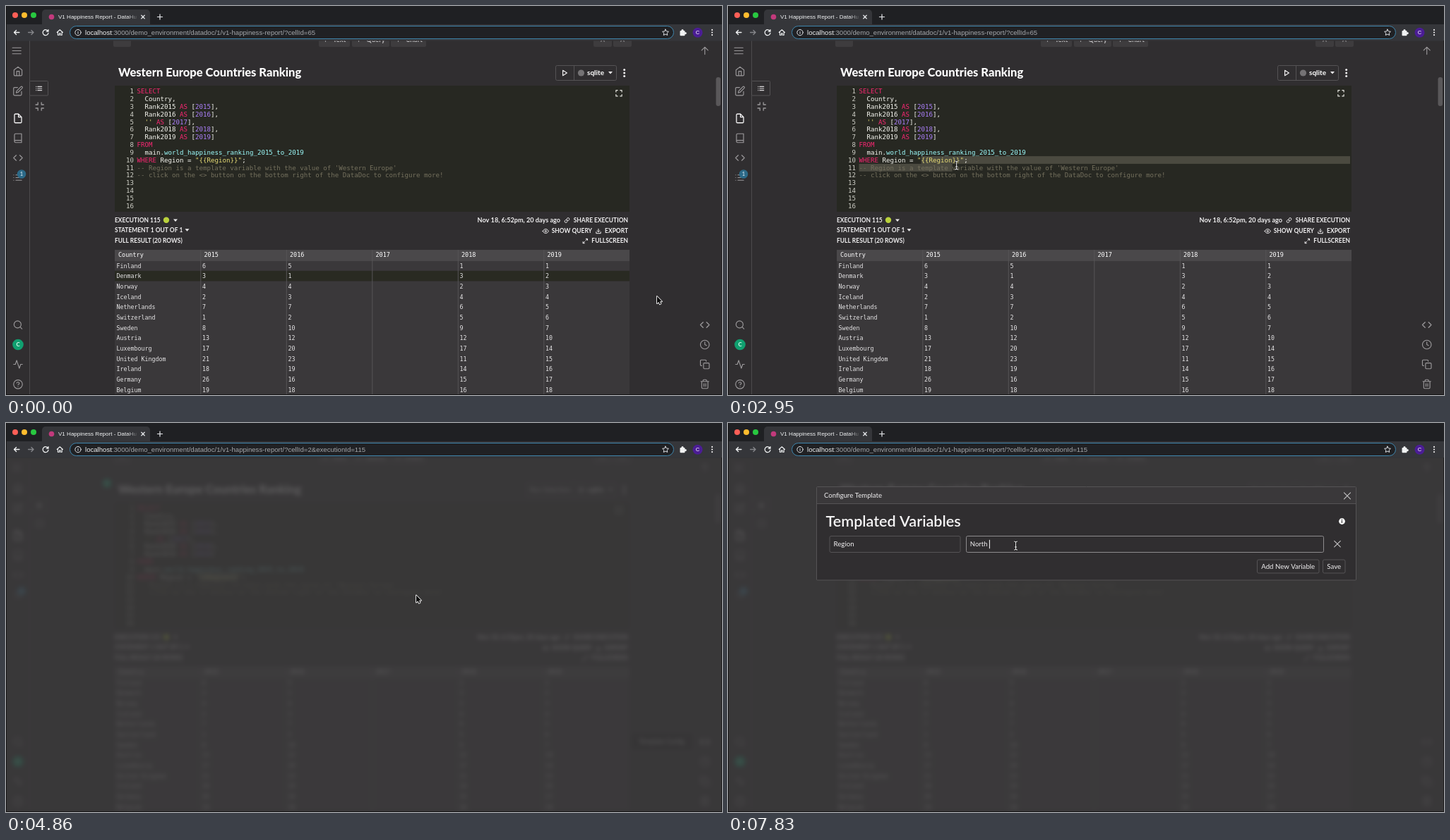
Recreate the animation shown at these times as an HTML page with a canvas. Size 1014 px wide and 552 px high, loop 8 s.

```html
<!DOCTYPE html>
<html lang="en">
<head>
<meta charset="utf-8">
<title>Happiness report</title>
<style>
html, body { margin: 0; width: 100%; height: 100%; overflow: hidden; background: #302e30; }
canvas { display: block; width: 1014px; height: 552px; }
</style>
</head>
<body>
<canvas id="stage"></canvas>
<script>
const W = 1014, H = 552, LOOP = 8000;
const dpr = window.devicePixelRatio || 1;
const UI = 'Lato, "Open Sans", sans-serif';
const SYS = '"Liberation Sans", Arial, sans-serif';
const MONO = '"DejaVu Sans Mono", monospace';
const BG = '#302e30', LINE = '#555355', DIM = '#9b999b', TEXT = '#f0eff0';

function setup(cv) {
  cv.width = W * dpr;
  cv.height = H * dpr;
  const g = cv.getContext('2d');
  g.scale(dpr, dpr);
  return g;
}
const main = setup(document.getElementById('stage'));
const layer = document.createElement('canvas');
const layerCtx = setup(layer);
let c = main;

// ---- drawing helpers ----
function rect(x, y, w, h, fill) {
  c.fillStyle = fill;
  c.fillRect(x, y, w, h);
}
function box(x, y, w, h, r, fill, stroke) {
  c.beginPath();
  c.roundRect(x, y, w, h, r);
  if (fill) { c.fillStyle = fill; c.fill(); }
  if (stroke) { c.strokeStyle = stroke; c.lineWidth = 1; c.stroke(); }
}
function dot(x, y, r, fill) {
  c.fillStyle = fill;
  c.beginPath();
  c.arc(x, y, r, 0, Math.PI * 2);
  c.fill();
}
function setFont(size, family = UI, weight = 400) {
  c.font = `${weight} ${size}px ${family}`;
}
// y is the middle of the capitals
function text(s, x, y, size, color = TEXT, family = UI, weight = 400, align = 'left') {
  setFont(size, family, weight);
  c.textAlign = align;
  c.fillStyle = color;
  c.fillText(s, x, y + size * 0.355);
}
function caret(x, y) {
  c.fillStyle = TEXT;
  c.fill(new Path2D(`M${x - 3} ${y - 1.6}h6l-3 3.6z`));
}
function kebab(x, y, gap, r) {
  for (let i = -1; i < 2; i++) dot(x, y + i * gap, r, TEXT);
}

// line icons on a 24 unit grid
const ICONS = {
  menu: 'M2 5h20M2 12h20M2 19h20',
  home: 'M3 9l9-7 9 7v11a2 2 0 0 1-2 2H5a2 2 0 0 1-2-2zM9 22V12h6v10',
  house: 'M2 12l10-9 10 9M5 10v11h5v-6h4v6h5V10',
  edit: 'M11 4H4a2 2 0 0 0-2 2v14a2 2 0 0 0 2 2h14a2 2 0 0 0 2-2v-7M18.5 2.5a2.1 2.1 0 0 1 3 3L12 15l-4 1 1-4z',
  file: 'M13 2H6a2 2 0 0 0-2 2v16a2 2 0 0 0 2 2h12a2 2 0 0 0 2-2V9zM13 2v7h7',
  book: 'M4 19.5A2.5 2.5 0 0 1 6.5 17H20M6.5 2H20v20H6.5A2.5 2.5 0 0 1 4 19.5v-15A2.5 2.5 0 0 1 6.5 2z',
  code: 'M16 18l6-6-6-6M8 6l-6 6 6 6',
  list: 'M8 6h13M8 12h13M8 18h13M3 6h.1M3 12h.1M3 18h.1',
  search: 'M19 11a8 8 0 1 1-16 0 8 8 0 0 1 16 0zM21 21l-4.3-4.3',
  activity: 'M22 12h-4l-3 9L9 3l-3 9H2',
  help: 'M22 12a10 10 0 1 1-20 0 10 10 0 0 1 20 0zM9.1 9a3 3 0 0 1 5.8 1c0 2-3 3-3 3M12 17h.1',
  info: 'M22 12a10 10 0 1 1-20 0 10 10 0 0 1 20 0zM12 16v-5M12 8h.1',
  clock: 'M22 12a10 10 0 1 1-20 0 10 10 0 0 1 20 0zM12 6v6l4 2',
  copy: 'M11 9h9a2 2 0 0 1 2 2v9a2 2 0 0 1-2 2h-9a2 2 0 0 1-2-2v-9a2 2 0 0 1 2-2zM5 15H4a2 2 0 0 1-2-2V4a2 2 0 0 1 2-2h9a2 2 0 0 1 2 2v1',
  trash: 'M3 6h18M19 6v14a2 2 0 0 1-2 2H7a2 2 0 0 1-2-2V6m3 0V4a2 2 0 0 1 2-2h4a2 2 0 0 1 2 2v2M10 11v6M14 11v6',
  up: 'M12 21V3M4 11l8-8 8 8',
  back: 'M21 12H4M11 5l-7 7 7 7',
  forward: 'M3 12h17M13 5l7 7-7 7',
  reload: 'M21 3v6h-6M20.5 9A9 9 0 1 0 21 14',
  star: 'M12 2l3.1 6.3 6.9 1-5 4.9 1.2 6.8-6.2-3.2L5.8 21 7 14.2 2 9.3l6.9-1z',
  shrink: 'M8 3v5H3M21 8h-5V3M3 16h5v5M16 21v-5h5',
  corners: 'M8 3H3v5M21 8V3h-5M3 16v5h5M16 21h5v-5',
  expand: 'M15 3h6v6M9 21H3v-6M21 3l-7 7M3 21l7-7',
  link: 'M10 13a5 5 0 0 0 7.5.5l3-3a5 5 0 0 0-7-7l-1.7 1.7M14 11a5 5 0 0 0-7.5-.5l-3 3a5 5 0 0 0 7 7l1.7-1.7',
  eye: 'M1 12s4-8 11-8 11 8 11 8-4 8-11 8-11-8-11-8zM15 12a3 3 0 1 1-6 0 3 3 0 0 1 6 0z',
  download: 'M21 15v6H3v-6M7 10l5 5 5-5M12 15V3',
  play: 'M5 3l14 9-14 9z',
  cross: 'M3 3l18 18M21 3L3 21',
  plus: 'M12 3v18M3 12h18',
  chevUp: 'M5 15l7-7 7 7',
  chevDown: 'M5 9l7 7 7-7'
};
for (const k in ICONS) ICONS[k] = new Path2D(ICONS[k]);

function icon(name, x, y, size, color = DIM, weight = 1.15) {
  const k = size / 24;
  c.save();
  c.translate(x - size / 2, y - size / 2);
  c.scale(k, k);
  c.strokeStyle = color;
  c.lineWidth = weight / k;
  c.lineCap = c.lineJoin = 'round';
  c.stroke(ICONS[name]);
  c.restore();
}

// ---- content ----
const COLORS = { k: '#f92672', w: '#f8f8f2', n: '#ae81ff', s: '#e6db74', t: '#9effff', c: '#75715e' };
const yearLine = (name, year, end = ',') => [['w', `  ${name} `], ['k', 'AS '], ['w', '['], ['n', year], ['w', ']' + end]];
const CODE = [
  [['k', 'SELECT']],
  [['w', '  Country,']],
  yearLine('Rank2015', '2015'),
  yearLine('Rank2016', '2016'),
  [['s', "  '' "], ['k', 'AS '], ['w', '['], ['n', '2017'], ['w', '],']],
  yearLine('Rank2018', '2018'),
  yearLine('Rank2019', '2019', ''),
  [['k', 'FROM']],
  [['w', '  main.'], ['t', 'world_happiness_ranking_2015_to_2019']],
  [['k', 'WHERE '], ['w', 'Region = '], ['s', '"{{Region}}"'], ['w', ';']],
  [['c', "-- Region is a template variable with the value of 'Western Europe'"]],
  [['c', '-- click on the <> button on the bottom right of the DataDoc to configure more!']]
];
const TABLE = `Finland 6 5 - 1 1|Denmark 3 1 - 3 2|Norway 4 4 - 2 3|Iceland 2 3 - 4 4|Netherlands 7 7 - 6 5
Switzerland 1 2 - 5 6|Sweden 8 10 - 9 7|Austria 13 12 - 12 10|Luxembourg 17 20 - 17 14|United_Kingdom 21 23 - 11 15
Ireland 18 19 - 14 16|Germany 26 16 - 15 17|Belgium 19 18 - 16 18`.split(/[|\n]/).map(r => r.split(' '));
const HEAD = ['Country', 2015, 2016, 2017, 2018, 2019];
const ROW = 14.67, COL = 121.5, CH = 5.506, LEAD = 10.83;

// ---- timing ----
// bursts of movement: first step, last step, number of steps
const BURSTS = [[150, 1180, 8], [1330, 2360, 8], [2510, 3530, 8], [3680, 4710, 8], [4860, 5450, 5],
  [5750, 5900, 2], [6200, 6200, 1], [7090, 7390, 3], [7680, 7830, 2]];
const LEAD_IN = 12; // steps are evenly spaced only to within this many ms
const STEPS = [0];
for (const [a, b, n] of BURSTS)
  for (let i = 0; i < n; i++) STEPS.push(n > 1 ? a + (b - a) * i / (n - 1) : a);

const PATH = [[0, 922, 412], [150, 953, 431], [297, 986, 447], [592, 986, 448], [739, 880, 372], [886, 560, 240],
  [1033, 330, 158], [1180, 268, 138], [1330, 265, 137], [1480, 288, 162], [1772, 338, 203], [1990, 348, 213],
  [2360, 276, 219], [2510, 274, 219], [2950, 324, 226], [3095, 330, 221], [3530, 330, 221], [3680, 372, 236],
  [3827, 580, 309], [3974, 850, 401], [4121, 953.5, 438], [4268, 986, 447], [4563, 986, 448], [4710, 880, 390],
  [4860, 581, 244.5], [5007, 465, 194], [5155, 415, 177], [5302, 407.5, 174], [LOOP, 407.5, 174]];

function pointer(t) {
  let i = 1;
  while (i < PATH.length - 1 && PATH[i][0] < t) i++;
  const [t0, x0, y0] = PATH[i - 1], [t1, x1, y1] = PATH[i];
  const k = (t - t0) / (t1 - t0);
  return [x0 + (x1 - x0) * k, y0 + (y1 - y0) * k];
}

// ---- page ----
function drawBrowser(t) {
  rect(0, 0, W, 27, '#1f2023');
  ['#ff5f57', '#febc2e', '#28c840'].forEach((col, i) => dot(13 + i * 13, 13, 4, col));
  box(51, 5, 153, 28, 5, '#35363a');
  rect(0, 26, W, 23.5, '#35363a');
  dot(64.5, 15.5, 3.8, '#c23a7c');
  const fade = c.createLinearGradient(172, 0, 186, 0);
  fade.addColorStop(0, '#f1f3f4');
  fade.addColorStop(1, '#f1f3f420');
  text('V1 Happiness Report - DataHu', 74, 15.3, 8.05, fade, SYS);
  icon('cross', 194, 15.5, 6, '#e8eaed', 1.2);
  icon('plus', 218, 15.5, 9.5, '#e8eaed', 1.2);
  icon('back', 15, 37.5, 10.5, '#f1f3f4', 1.3);
  icon('forward', 35.5, 37.5, 10.5, '#85868a', 1.3);
  icon('reload', 56, 37.5, 10.5, '#f1f3f4', 1.3);
  icon('house', 76.3, 37.5, 10, '#f1f3f4', 1.1);
  box(90.5, 28.5, 855, 18, 9, '#202124', '#3f86ad');
  icon('info', 102, 37.6, 10, '#dfe1e5', 1);
  const host = 'localhost', size = 9.6;
  text(host, 112, 37.3, size, '#f1f3f4', SYS);
  const query = t >= 3675 ? '2&executionId=115' : '65';
  text(`:3000/demo_environment/datadoc/1/v1-happiness-report/?cellId=${query}`,
    112 + c.measureText(host).width, 37.3, size, '#a5a8ac', SYS);
  icon('star', 934, 37.5, 10.5, '#dfe1e5', 1);
  box(954.5, 35, 7, 7.3, 1, '#f1f3f4');
  dot(958, 34.7, 1.6, '#f1f3f4');
  dot(962.2, 38.6, 1.6, '#f1f3f4');
  dot(979.5, 37.7, 7, '#4b1d95');
  text('C', 979.5, 37.7, 7.5, '#fff', SYS, 400, 'center');
  kebab(1000, 37.5, 3.6, 1.1);
}

function avatar(x, y, r) {
  dot(x, y, r, '#10a070');
  text('C', x, y, r, '#e6fff5', UI, 700, 'center');
}

function drawSides(overCode) {
  rect(33, 49, 1, H, '#4c4a4c');
  icon('menu', 15.2, 63.5, 14.5);
  ['home', 'edit'].forEach((n, i) => icon(n, 17, 92.6 + i * 28, 15));
  icon('file', 17, 159.5, 15, '#f4f3f4', 1.3);
  icon('book', 17, 187.5, 15);
  icon('code', 17, 215.5, 15);
  icon('list', 16.5, 243.5, 15);
  dot(22, 238.5, 6.3, '#2c6a88');
  text('1', 22, 238.5, 7.5, '#e8f4fa', UI, 400, 'center');
  icon('search', 17, 452.5, 15);
  avatar(17, 480.5, 7.8);
  icon('activity', 17, 508.5, 15);
  icon('help', 17, 536.8, 15);
  box(33.5, 106.5, 26, 20.5, 1, BG, LINE);
  icon('list', 46.7, 117, 10.5, '#dddcdd', 1.2);
  icon('shrink', 47.7, 142.5, 15, DIM, 1.3);
  icon('up', 989.7, 63.5, 13.5);
  icon('code', 989.7, 452.5, 15, overCode ? '#fff' : DIM, 1.3);
  icon('clock', 989.7, 480.5, 15);
  icon('copy', 989.7, 508.5, 15);
  icon('trash', 989.7, 536.5, 15);
  box(1005.5, 101, 6.5, 41, 3.2, '#5a585a');
}

function drawHeader(t) {
  [[152, 25], [443, 44], [490, 53], [545, 50], [832, 26], [860, 26]].forEach(([x, w]) => box(x, 40, w, 18, 2, '#3e3c3e'));
  icon('chevDown', 164.5, 47, 9, '#c9c8c9');
  [['Text', 463, 452.5], ['Query', 510, 499.5], ['Chart', 566, 555.5]].forEach(([s, x, px]) => {
    icon('plus', px, 47.5, 7, '#c9c8c9');
    text(s, x, 48, 9.6, '#c9c8c9', UI, 700);
  });
  icon('chevUp', 845, 49, 8, '#c9c8c9');
  icon('chevUp', 873, 49, 8, '#c9c8c9');

  text('Western Europe Countries Ranking', 159, 94.5, 16.55, '#fff', UI, 800);
  const run = t >= 3230, left = run ? 736.5 : 778.5;
  box(left, 84.5, 864.5 - left, 21, 2, BG, LINE);
  rect(804, 85, 1, 20, LINE);
  if (run) text('Run Selection', 742, 94.7, 9.6);
  else icon('play', 791.5, 95, 10, TEXT, 1.2);
  if (run && t < 5000) avatar(143, 85.5, 6.5);
  dot(814.5, 95, 4.6, '#757375');
  text('sqlite', 823, 94.6, 10, '#fff', UI, 700);
  caret(856, 94.5);
  kebab(875.7, 95, 4.6, 1.5);
}

function drawSelection(t, x) {
  const y = 213.1, start = 185.5 + CH * 16, ink = '#4b4a40';
  if (t < 2510) return;
  if (t >= 3090) rect(start, y, CH * 10, LEAD, '#4c5248');
  else if (t < 2945) rect(start, y, Math.max(0, Math.round((x - start) / CH) * CH), LEAD, ink);
  else {
    rect(start, y, 881 - start, LEAD, ink);
    rect(185.5, y + LEAD, CH * 24, LEAD, ink);
  }
}

function drawEditor(t, x) {
  rect(154, 113, 729, 179, '#272822');
  drawSelection(t, x);
  for (let i = 0; i < 16; i++) {
    const y = 121.1 + i * LEAD;
    text(i + 1, 181, y, 9.146, '#d0d0c8', MONO, 400, 'right');
    let n = 0;
    for (const [kind, s] of CODE[i] || []) {
      text(s, 185.5 + n * CH, y, 9.146, COLORS[kind], MONO);
      n += s.length;
    }
  }
  icon('corners', 868, 123.8, 11, '#e4e4de', 1.2);
}

function drawStatus() {
  const label = (s, x, y, align, size = 8.45) => text(s, x, y, size, TEXT, UI, 700, align);
  label('EXECUTION 115', 154, 303.8);
  dot(227, 303.8, 4.2, '#b9d13c');
  caret(240, 304);
  label('STATEMENT 1 OUT OF 1', 154, 317.8);
  caret(256.5, 317.8);
  label('FULL RESULT (20 ROWS)', 154, 333.2);
  label('Nov 18, 6:52pm, 20 days ago', 785, 303.8, 'right', 9.15);
  icon('link', 794.5, 304, 8.5, TEXT, 1);
  label('SHARE EXECUTION', 881, 303.8, 'right');
  icon('eye', 764.3, 319.5, 9, TEXT, 1);
  label('SHOW QUERY', 830, 319.3, 'right');
  icon('download', 839, 319.5, 8.5, TEXT, 1);
  label('EXPORT', 881, 319.3, 'right');
  icon('expand', 820.3, 333.5, 8.5, TEXT, 1);
  label('FULLSCREEN', 881, 333.2, 'right');
}

function drawTable(hover) {
  rect(154, 346, 729, H, '#3a383a');
  rect(154, 346, 729, 15, '#4a484a');
  if (hover >= 0) rect(154, 361.1 + hover * ROW, 729, ROW, '#292a22');
  for (let i = 1; i < 6; i++) rect(153.8 + i * COL, 346, 1, H, '#565456');
  rect(154, 361, 729, 0.6, '#565456');
  HEAD.forEach((s, i) => text(s, 159 + i * COL, 353.4, 8.5, '#fff', MONO));
  TABLE.forEach((r, j) => r.forEach((s, i) => {
    if (s !== '-') text(s.replace('_', ' '), 156.5 + i * COL, 368.7 + j * ROW, 8.3, '#e6e5e6', MONO);
  }));
}

function drawPage(t, x, y) {
  const overCode = (t > 290 && t < 600) || (t > 4260 && t < 5000);
  let hover = -1;
  if (t < 140) hover = 1;
  else if (t < 4700 && x > 154 && x < 883 && y > 361) hover = Math.floor((y - 361) / ROW);
  rect(0, 49, W, H, BG);
  drawHeader(t);
  drawEditor(t, x);
  drawStatus();
  drawTable(hover);
  drawSides(overCode);
  if (overCode) {
    box(885, 441, 87, 22, 4, '#1f1e1f');
    text('Template Config', 928.5, 452, 9, TEXT, UI, 400, 'center');
  }
  if (t > 3960 && t < 4260) {
    const tone = c.createLinearGradient(0, 0, 345, 0);
    tone.addColorStop(0, '#333133c0');
    tone.addColorStop(1, '#33313390');
    rect(1, 537.5, 340, 14, tone);
    text('Waiting for localhost...', 5, 544.5, 8.03, '#a09ea0', SYS);
  }
}

// ---- dialog ----
function drawVeil(amount) {
  c.save();
  c.beginPath();
  c.rect(0, 49.5, W, H);
  c.clip();
  c.filter = `blur(${3 * amount * dpr}px)`;
  c.drawImage(layer, 0, 0, W, H);
  c.filter = 'none';
  rect(0, 49, W, H, `rgba(60,58,60,${0.83 * amount})`);
  c.restore();
}

function drawField(t) {
  const value = t < 7085 ? 'Western Europe' : t < 7235 ? 'N' : t < 7385 ? 'No' : t < 7675 ? 'Nor' : t < 7825 ? 'North' : 'North ';
  const x = 342.8, size = 9.5;
  setFont(size);
  const w = c.measureText(value).width;
  if (t >= 5895 && t < 7085) {
    const skip = t < 6195 ? c.measureText('Western ').width : 0;
    rect(x + skip, 165.8, w - skip, 12.6, '#5f88b0');
  }
  text(value, x, 171.7, size);
  if (t >= 7085) rect(x + w, 165.8, 1, 12.4, '#fff');
}

function drawDialog(t) {
  box(125.5, 90.5, 764, 132.5, 1, BG, LINE);
  rect(126, 91, 763, 23, '#3a383a');
  rect(126, 114, 763, 1, LINE);
  text('Configure Template', 136, 102.3, 9.6);
  icon('cross', 877, 103.3, 12, '#c4c3c4', 1.1);
  text('Templated Variables', 138.5, 139.3, 21.6, '#f6f5f6', UI, 600);
  dot(869.5, 139.5, 4.4, '#fff');
  text('i', 869.5, 139.5, 7, BG, UI, 900, 'center');
  box(144, 160.5, 185, 23, 2, BG, LINE);
  text('Region', 149.5, 171.7, 9.7);
  box(337.5, 160.5, 506, 23, 2, BG, t >= 5745 ? '#8e8c8e' : LINE);
  drawField(t);
  icon('cross', 863, 171.6, 11.5, '#c4c3c4', 1.1);
  box(749.5, 194, 87.5, 19, 2, BG, LINE);
  text('Add New Variable', 793.2, 203.6, 9.65, TEXT, UI, 400, 'center');
  box(842.5, 194, 31.5, 19, 2, BG, LINE);
  text('Save', 858.2, 203.6, 9.65, TEXT, UI, 400, 'center');
}

// ---- pointer ----
const ARROW = new Path2D('M0 0V10L2.3 8L3.9 11.3L5.5 10.5L4 7.3H7z');
const BEAM = new Path2D('M-2.5-6Q0-6 0-4.5Q0-6 2.5-6M0-4.5V4.5M-2.5 6Q0 6 0 4.5Q0 6 2.5 6M-1.5 2H1.5');

function drawPointer(t, x, y) {
  const beam = t < 4700 ? x > 185 && x < 883 && y > 113 && y < 292 : t > 5000 && y < 184;
  c.save();
  c.translate(x, y);
  c.lineJoin = 'round';
  if (beam) {
    c.strokeStyle = '#000a';
    c.lineWidth = 2.4;
    c.stroke(BEAM);
    c.strokeStyle = '#e8e8e8';
    c.lineWidth = 1.1;
    c.stroke(BEAM);
  } else {
    c.strokeStyle = '#f4f4f4';
    c.lineWidth = 1.8;
    c.stroke(ARROW);
    c.fillStyle = '#0a0a0a';
    c.fill(ARROW);
  }
  c.restore();
}

function drawScene(t) {
  const [x, y] = pointer(t);
  const veil = t < 4700 ? 0 : t < 4855 ? 0.5 : 1;
  if (veil) {
    c = layerCtx;
    drawPage(t, x, y);
  }
  c = main;
  if (veil) {
    rect(0, 49, W, H, BG);
    drawVeil(veil);
  } else drawPage(t, x, y);
  drawBrowser(t);
  if (t >= 5000) drawDialog(t);
  rect(0, 0, 1, H, '#151415');
  rect(0, 551, W, 1, '#151415');
  rect(1013, 49, 1, H, '#1d1c1d');
  drawPointer(t, x, y);
}

let shown = -1;
function tick() {
  const t = performance.now() % LOOP;
  const step = STEPS.findLast(s => s - LEAD_IN <= t);
  if (step !== shown) {
    shown = step;
    drawScene(step);
  }
  requestAnimationFrame(tick);
}
tick();
</script>
</body>
</html>
```
